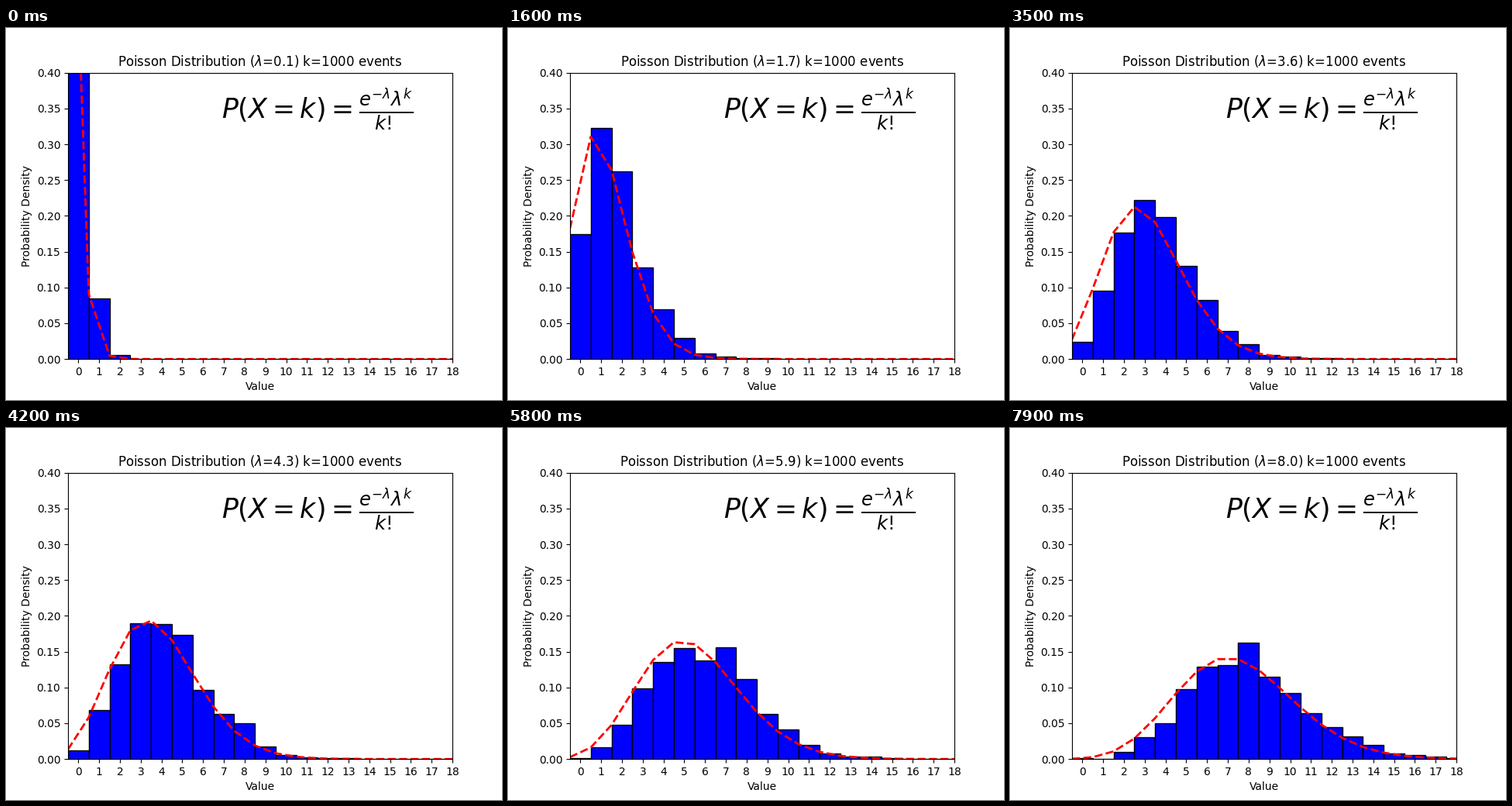
These frames come from a looping animation (640 px wide and 480 px high, 8 s). A matplotlib script:

```python
import numpy as np
import matplotlib.pyplot as plt
from math import factorial
from matplotlib.animation import FuncAnimation

FRAMES, INTERVAL = 80, 100
EVENTS = 1000
K = np.arange(20)
EDGES = K - 0.5
FACT = np.array([factorial(k) for k in K], dtype=float)


def pmf(lam):
    return np.exp(-lam) * lam ** K / FACT


def sample_density(lam, seed):
    """Share of each value among seeded Poisson draws."""
    draws = np.random.default_rng(seed).poisson(lam, EVENTS)
    return np.bincount(draws, minlength=len(K))[:len(K)] / EVENTS


fig, ax = plt.subplots(figsize=(6.4, 4.8), dpi=100)
bars = ax.bar(EDGES, np.zeros(len(K)), width=1, align="edge",
              color="blue", edgecolor="black")
curve, = ax.plot(EDGES, np.zeros(len(K)), "r--", linewidth=2)
ax.set_xlim(-0.5, 18)
ax.set_ylim(0, 0.4)
ax.set_xticks(range(19))
ax.set_xlabel("Value")
ax.set_ylabel("Probability Density")
title = ax.set_title("")
ax.text(0.4, 0.95, r"$P(X=k)=\frac{e^{-\lambda}\lambda^k}{k!}$",
        transform=ax.transAxes, fontsize=25, va="top")


def update(i):
    lam = (i + 1) / 10
    for bar, height in zip(bars, sample_density(lam, seed=i)):
        bar.set_height(height)
    # The curve is drawn at the left edge of each bar.
    curve.set_ydata(pmf(lam))
    title.set_text(rf"Poisson Distribution ($\lambda$={lam:.1f}) k={EVENTS} events")
    return [*bars, curve, title]


anim = FuncAnimation(fig, update, frames=FRAMES, interval=INTERVAL,
                     repeat=True, repeat_delay=0, blit=False)
plt.show()
```
